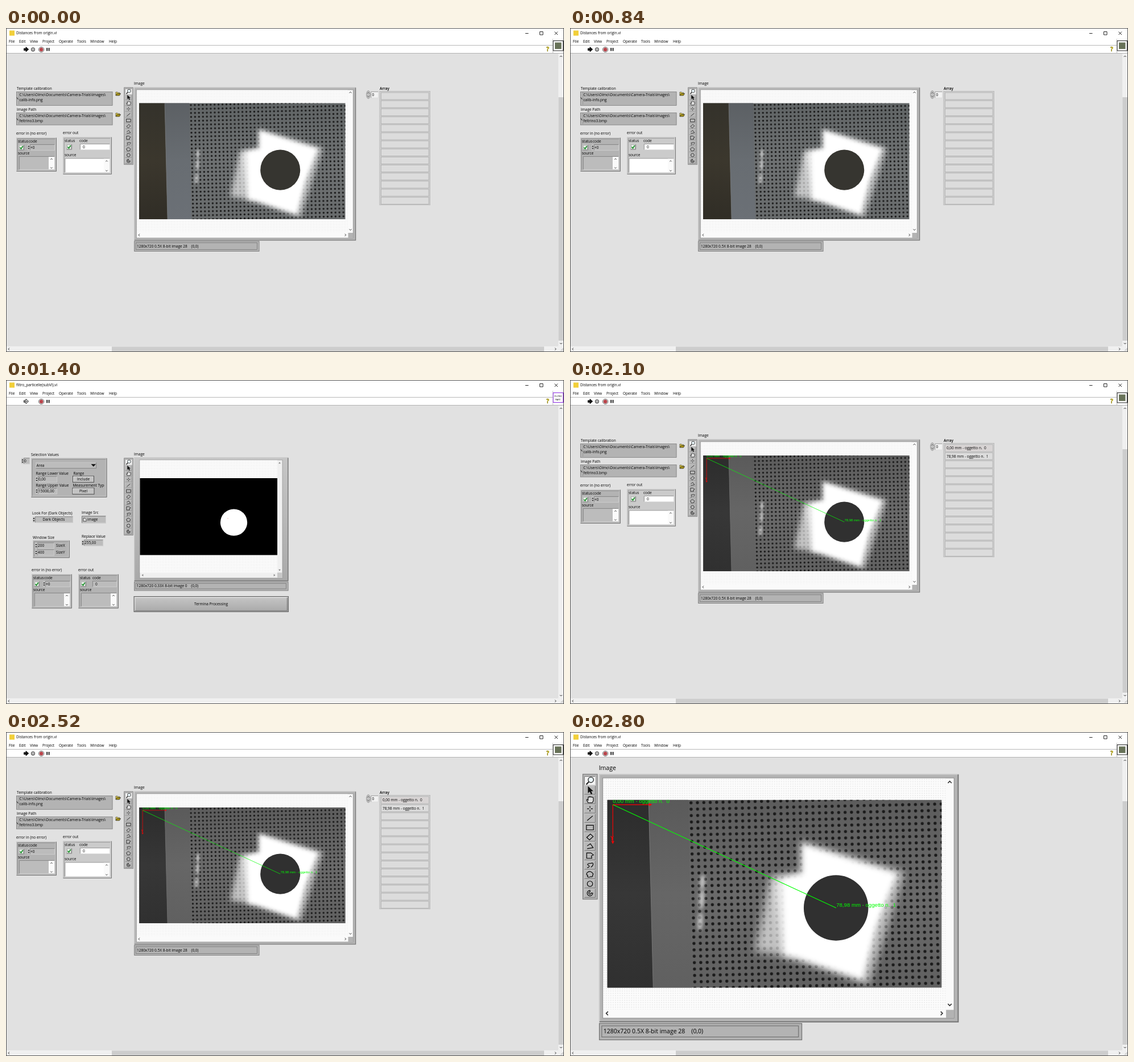
An HTML page that plays this animation: 981 px wide and 571 px high, repeating every 3.5 s.

```html
<!DOCTYPE html>
<html lang="en">
<head>
<meta charset="utf-8">
<title>Vision panel</title>
<style>
html, body { margin: 0; width: 100%; height: 100%; overflow: hidden; background: #e1e1e1; }
svg { display: block; width: 981px; height: 571px; }
text { font-family: "Open Sans", "Noto Sans", sans-serif; font-size: 6.5px; white-space: pre; }
.mark text { font-family: "Liberation Sans", Arial, sans-serif; font-size: 5.95px; fill: #0f0; }
</style>
</head>
<body>
<svg id="stage" viewBox="0 0 981 571"></svg>
<script>
const LOOP = 3500;
const GREY = '#b3b3b3';
const ZOOM = 'matrix(1.6215 0 0 1.6215 -314.2 -95.7)';

const rect = (x, y, w, h, fill, stroke = 'none', sw = 0.6) =>
  `<rect x="${x}" y="${y}" width="${w}" height="${h}" fill="${fill}" stroke="${stroke}" stroke-width="${sw}"/>`;
const path = (d, stroke = '#000', sw = 0.7, fill = 'none') =>
  `<path d="${d}" fill="${fill}" stroke="${stroke}" stroke-width="${sw}"/>`;
const circle = (x, y, r, fill, stroke = 'none', sw = 0.7) =>
  `<circle cx="${x}" cy="${y}" r="${r}" fill="${fill}" stroke="${stroke}" stroke-width="${sw}"/>`;
// y is the vertical middle of the text
const text = (x, y, s, attrs = '') => `<text x="${x}" y="${y + 2.2}" ${attrs}>${s}</text>`;
const group = (content, attrs = '') => `<g ${attrs}>${content}</g>`;
const at = (x, y, content) => group(content, `transform="translate(${x} ${y})"`);

function bevel(x, y, w, h, fill = GREY, raised = true, sw = 1) {
  const [a, b] = raised ? ['#c8c8c8', '#777'] : ['#777', '#d0d0d0'];
  const r = x + w - sw / 2, d = y + h - sw / 2, l = x + sw / 2, t = y + sw / 2;
  return rect(x, y, w, h, fill) + path(`M${l} ${d}V${t}H${r}`, a, sw) + path(`M${l} ${d}H${r}V${t}`, b, sw);
}
const frame = (x, y, w, h, fill = GREY) => bevel(x, y, w, h, fill) + bevel(x + 2, y + 2, w - 4, h - 4, fill, false, 0.6);

const turns = { up: 0, right: 90, down: 180, left: 270 };
const chevron = (x, y, dir, s = 1, color = '#333') =>
  `<path d="M-2 1L0 -1L2 1" transform="translate(${x} ${y}) rotate(${turns[dir]}) scale(${s})" fill="none" stroke="${color}" stroke-width="1"/>`;
const triangle = (x, y, dir, color = '#888') =>
  `<path d="M-2 1.3L0 -1.5L2 1.3Z" transform="translate(${x} ${y}) rotate(${turns[dir]})" fill="${color}"/>`;
const spinner = (x, y) => rect(x, y - 5, 4, 10, '#c8c8c8') +
  path(`M${x + .4} ${y - 1}l1.6 -2.5l1.6 2.5zM${x + .4} ${y + 1}l1.6 2.5l1.6 -2.5z`, 'none', 0, '#222');
const field = (x, y, w, s, fill = '#bcbcbc') =>
  bevel(x + 4, y - 5.5, w - 4, 11, fill, false, 0.8) + spinner(x, y) + text(x + 5, y, s);
const button = (x, y, w, s) => rect(x, y - 5.5, w, 11, '#c3c3c3', '#333', 0.8) +
  path(`M${x + 1} ${y + 4.5}v-9h${w - 2}`, '#eee', 0.7) + text(x + w / 2, y, s, 'text-anchor="middle"');
const check = (x, y) => bevel(x - 5, y - 5, 10, 10, '#d5d5d5', true, 0.9) +
  rect(x - 3.6, y - 3.6, 7.2, 7.2, '#e9f3e9', '#666', 0.4) +
  path(`M${x - 2.5} ${y}l2 2.5l3.2 -5`, '#138a22', 1.6);
const statusBar = (x, y, w, h, s) => rect(x + .4, y + .4, w - .8, h - .8, GREY, '#757575', 0.8) +
  rect(x + 3, y + 3, w - 7, h - 6.5, GREY, '#6e6e6e', 0.7) + text(x + 4.8, y + h / 2 - 0.3, s);

// ---------- window chrome ----------
function chrome(title, subVi) {
  let s = rect(0, 0, 981, 571, '#e1e1e1') + rect(0, 0, 981, 44, '#fff');
  s += path('M0 30.5H961M0 44.5H981', '#a5a5a5', 0.8);
  s += rect(6, 4.5, 9, 9, '#f2cf3a') + text(18, 9.2, title);
  const menu = { File: 5, Edit: 23, View: 42, Project: 64, Operate: 93, Tools: 125, Window: 148, Help: 181 };
  for (const name in menu) s += text(menu[name], 23.7, name);
  s += path('M913 9.5h5.5M938.5 6.5h5.5v5.5h-5.5zM964.5 6.5l5.5 5.5m0 -5.5l-5.5 5.5', '#111', 0.9);

  const arrow = 'M31.5 36h3.5v-2.5l4.8 4.2l-4.8 4.2v-2.5h-3.5z';
  s += path(arrow, '#111', 0.9, subVi ? '#fff' : '#111');
  if (subVi) s += path('M32 37.8h6', '#111', 1);
  else s += circle(47.5, 37.8, 3, '#eee', '#555', 1.2) + path('M45 38h5M47.5 35.5v5', '#777', 0.7);
  s += path('M60.2 33.6h3.8l2.6 2.6v3.6l-2.6 2.6h-3.8l-2.6 -2.6v-3.6z', '#555', 0.8, '#ddd') + circle(62.1, 38, 3.2, '#b8434a');
  s += path('M72.2 35v5.6M75.6 35v5.6', '#111', 1.8);
  s += `<text x="950" y="41.3" style="font-size:10px;font-weight:700" fill="#e8d000" stroke="#554c00" stroke-width=".35">?</text>`;

  s += path('M961.5 19V44', '#999', 0.6);
  if (subVi) {
    s += rect(962, 22.5, 17.5, 17, '#fff', '#8a2be2', 1);
    s += text(970.7, 27.5, 'FILTRO', 'text-anchor="middle" style="font-size:4px"');
    s += text(970.7, 33.5, 'PART.', 'text-anchor="middle" style="font-size:4px"');
  } else s += rect(962, 22.5, 17.5, 17.5, '#fff', '#222', 1) + rect(965, 25.5, 11.5, 11.5, '#687258');

  s += rect(971, 45, 9.5, 516, '#f0f0f0') + rect(1, 561, 979, 9.5, '#f0f0f0');
  if (!subVi) s += rect(971.3, 122, 8.7, 429, '#cdcdcd') + rect(186, 561.5, 760, 8.5, '#cdcdcd');
  s += chevron(975.7, 50, 'up') + chevron(975.7, 556, 'down') + chevron(5, 565.8, 'left') + chevron(966, 565.8, 'right');
  s += path('M979 564v5m-2 -3v3m-2 -1v1', '#aaa', 0.8);
  return s + rect(0.5, 0.5, 980, 570, 'none', '#555', 1);
}

// ---------- image tools ----------
const toolIcons = [
  circle(1, -1, 2.9, '#eaf6fa', '#222', 0.8) + path('M-1.2 1.2L-4 4', '#222', 1.3),
  path('M-2 -4v7l1.8 -1.6l1.4 3l1.2 -.6l-1.4 -2.8h2.3z', '#000', 0.3, '#111'),
  path('M-2 3.5L-3.6 .5l.6 -.7l1 1v-3.3q.8 -.8 1.2 0q.9 -1.4 1.7 0q1 -.8 1.6 .2q1.2 -.4 1.2 .8v3l-1.2 2z', '#222', 0.8, '#ddd'),
  path('M0 -3v2m0 2v2M-3 0h2m2 0h2'),
  path('M-3 2.5L3 -2.5'),
  path('M-3.8 -2.5h7.6v5h-7.6z'),
  path('M-3.5 .5L.5 -3.2L3.5 -.5L-.5 3.2z'),
  path('M-3 -.5L.5 -2.8L3.5 1.5L-3 2.6'),
  path('M-3.5 -3h4.5l2.8 2.2l-2.3 1.2l.5 2.4h-5.5z'),
  path('M-3 2.7C-1 3 0 1 -1.5 .3C-4 -.5 -2 -2 1 -1.8C5 -3.5 3.5 1 1 2.4'),
  path('M-2.5 -2.3Q0 -4 2 -2.2Q4.5 -.5 2.8 .8Q3.5 3 .8 2.4Q-2 4 -2.8 2Q-1.6 1 -3.5 .4Q-4 -1.5 -2.5 -2.3z'),
  circle(0, 0, 2.9, 'none', '#000'),
  path('M0 -3a3 3 0 1 0 3 3l-1.7 -.2a1.3 1.3 0 1 1 -1.2 -1.2z')
];
const tools = toolIcons.reduce((s, icon, i) => {
  const y = 112 + i * 10.18;
  return s + bevel(209.2, y - 4.9, 12.3, 9.8, i ? '#b8b8b8' : '#f4f4f4', i > 0, 0.6) + at(215.4, y, icon);
}, rect(207.7, 104.9, 15.7, 135.8, GREY, '#808080', 0.8));

// ---------- camera picture ----------
function photo(p) {
  const glow = (points, blur, opacity) =>
    `<polygon points="${points}" fill="#fff" opacity="${opacity}" filter="url(#blur${blur})"/>`;
  const streak = (x, y, ry) =>
    `<ellipse cx="${x}" cy="${y}" rx="2.4" ry="${ry}" fill="#fff" opacity=".7" filter="url(#blur2)" transform="rotate(4 ${x} ${y})"/>`;
  return group(
    rect(234, 132, 364, 206, p.sheet) +
    path('M234 132H279L284 338H234z', 'none', 0, p.dark) +
    path('M279 132H322L326 338H284z', 'none', 0, p.band) +
    path('M279 132L284 338', p.edge, 0.5) +
    path('M322 132H598V338H326z', 'none', 0, 'url(#holes)') +
    streak(337.3, 222, 8) + streak(336.5, 241, 11) + streak(335, 265, 10) +
    glow('411,218 446,212 436,304 394,297', 5, 0.6) +
    glow('443,177 557,211 518,334 424,303 413,216 443,214', 4, 0.55) +
    glow('446,181 548,213 526,270 511,328 427,300 424,219 446,213', 3, 1) +
    `<ellipse cx="482.2" cy="250.2" rx="35" ry="35.6" fill="${p.disc}"/>`,
    `clip-path="url(#${p.clip})"`);
}
const colourPhoto = photo({ sheet: 'url(#sheetC)', dark: 'url(#darkC)', band: 'url(#bandC)', edge: '#808383', disc: '#363530', clip: 'clipC' });
const greyPhoto = photo({ sheet: 'url(#sheetG)', dark: 'url(#darkG)', band: 'url(#bandG)', edge: '#7a7a7a', disc: '#303030', clip: 'clipG' });

const marks = group(
  path('M240.2 138V180m-1.2 -2.5l1.2 2.5l1.2 -2.5M240.2 138H282m-2.5 -1.2l2.5 1.2l-2.5 1.2M238 172l1.4 2.3l1.4 -2.3M239.4 174.3v2.5', '#f00', 0.7) +
  path('M240.2 138L482.3 250.2', '#0f0', 0.7) +
  '<text x="240.2" y="136.4">0,00 mm - oggetto n.  0</text><text x="482.5" y="249">78,98 mm - oggetto n.  1</text>',
  'class="mark" clip-path="url(#clipG)"');

const viewer = text(225, 98, 'Image') + tools +
  bevel(225.2, 104.6, 390, 270, GREY, true, 1.2) +
  rect(229.3, 109, 380.9, 261, '#fafafa', '#888', 0.6) +
  rect(230, 109.5, 371, 251, 'url(#weave)') +
  rect(601.5, 361, 8.5, 8.8, GREY) +
  chevron(605.5, 113.5, 'up') + chevron(605.5, 355.5, 'down') +
  chevron(234, 364.8, 'left') + chevron(596.7, 364.8, 'right') +
  statusBar(225.2, 375.4, 220.3, 18.6, '1280x720 0.5X 8-bit image 28    (0,0)');

// ---------- main panel controls ----------
function pathBox(y, h, label, folder, file) {
  const glyph = path(`M19 ${y + 10.5}l2.4 3.2M19.2 ${y + 13}h.1M21.3 ${y + 10.6}h.1`, '#111', 1);
  const open = path(`M193 ${y + 7}v-6h3l1 1h3v1.5`, '#333', 0.7, '#e9d34c') +
    path(`M193 ${y + 7}l2 -3.5h6.5l-2 3.5z`, '#222', 0.7, '#a99417');
  return text(19, y - 5.5, label) + rect(18.4, y + .4, 168.7, h, GREY, '#7d7d7d', 0.8) +
    path(`M22.7 ${y + 1}v${h - 2}`, '#8a8a8a', 0.6) + glyph + text(23.5, y + 5.8, folder) + text(23.5, y + 14.3, file) + open;
}

function errorBox(x, y, title, w, h, { white = false, spin = true, gap = 0 } = {}) {
  const fill = white ? '#fff' : '#bcbcbc';
  const stepper = spin && !white;
  const codeX = x + (white ? 29 : spin ? 22 : 25);
  const fieldX = x + (white ? 30 : spin ? 20 : 25);
  const edgeX = fieldX + (stepper ? 4 : 0);
  const srcX = x + (white ? 3.5 : 5), srcY = y + 33 + gap;
  return text(x, y - 7, title) + frame(x, y, w, h, white ? '#cbcbcb' : GREY) +
    text(x + 3, y + 6.3, 'status') + text(codeX, y + 6.3, 'code') + check(x + (white ? 11 : 9), y + 17.5) +
    (stepper ? spinner(x + 20, y + 17.5) : '') +
    bevel(edgeX, y + 12, x + w - 3 - edgeX, 11, fill, false, 0.8) +
    text(fieldX + 5, y + 17.5, stepper ? '×0' : '0') +
    text(x + 3, y + 27.5 + gap, 'source') +
    bevel(srcX, srcY, x + w - 3 - srcX, y + h - 3 - srcY, fill, false, 0.8) +
    rect(x + w - 14, srcY + 1, 10, y + h - 5 - srcY, '#fafafa') +
    chevron(x + w - 9, srcY + 5, 'up', 0.9) + chevron(x + w - 9, y + h - 6.5, 'down', 0.9);
}

const folder = 'C:\\Users\\Olmo\\Documents\\Camera-Trials\\Images\\';
let cells = '';
for (let i = 0; i < 14; i++) cells += rect(659.4, 113.9 + i * 14.18, 83.8, 12.2, '#dcdcdc', '#acacac', 0.8);
const mainPanel =
  pathBox(112, 24, 'Template calibration', folder, 'calib-info.png') +
  pathBox(149, 21.5, 'Image Path', folder, 'feltrino3.bmp') +
  errorBox(18, 193, 'error in (no error)', 71, 60) +
  errorBox(100, 192, 'error out', 86, 66, { white: true, gap: 4.5 }) +
  text(657, 106.5, 'Array', 'font-weight="600"') +
  `<ellipse cx="637" cy="117.5" rx="3.4" ry="7" fill="#c4c4c4" stroke="#888" stroke-width=".7"/>` +
  path('M635 116l2 -3l2 3M635 119l2 3l2 -3', '#555', 0.7) +
  bevel(641.5, 112, 13.5, 11.5, '#f2f2f2', false, 0.7) + text(643.5, 117.8, '0') +
  rect(656.9, 111.4, 88.7, 200.4, '#d0d0d0', '#b4b4b4', 0.8) + cells;

const results = rect(660, 115, 82.5, 10.6, '#d8d4d4') + text(662, 120.2, '0,00 mm - oggetto n.  0') +
  text(662, 134.4, '78,98 mm - oggetto n.  1');

// ---------- particle filter panel ----------
const filterPanel =
  text(44, 132, 'Selection Values') + field(27, 142.7, 15, '0') + frame(44, 137.5, 133.5, 69.5) +
  bevel(52, 145, 107, 11, '#bcbcbc', true, 0.8) + text(53.5, 150.5, 'Area') +
  path('M149.5 148.3h8.5l-4.2 4.4z', 'none', 0, '#111') +
  text(52.5, 164.3, 'Range Lower Value') + text(118.5, 164.3, 'Range') +
  field(52, 175, 38, '0,00') + button(117.5, 174.7, 37, 'Include') +
  text(52.5, 185.3, 'Range Upper Value') +
  group(text(117.5, 185.3, 'Measurement Type'), 'clip-path="url(#clipLabel)"') +
  field(52, 195.8, 38, '15000,00') + button(117, 195.7, 38, 'Pixel') +
  text(46, 234.5, 'Look For (Dark Objects)') + field(47, 246, 71, '') + text(84, 246, 'Dark Objects', 'text-anchor="middle"') +
  text(133, 233.5, 'Image Src') + bevel(133, 239.5, 43, 13, '#bcbcbc', false, 1) +
  path('M136 243.5h3l2 2v3.5h-5z', '#222', 0.7, '#ddd') + text(143, 246, 'image') +
  text(47, 277.5, 'Window Size') + frame(47, 282.5, 65, 31) +
  field(51, 292, 34, '200') + text(88, 292, 'SizeX') + field(51, 304, 34, '400') + text(88, 304, 'SizeY') +
  text(133, 275.5, 'Replace Value') + field(133, 287, 38, '255,00') +
  errorBox(45, 342, 'error in (no error)', 71, 60.5) +
  errorBox(127, 342, 'error out', 71, 60.5, { spin: false }) +
  at(0, 32.8, tools) + text(225, 130.8, 'Image') +
  bevel(225, 136.5, 271.5, 218, 'url(#metal)', true, 1.4) +
  rect(235, 141, 251, 208, '#f0f0f0', '#888', 0.6) + rect(235.5, 141.5, 241.5, 198, 'url(#weave)') +
  rect(477, 339.5, 9, 9.5, '#c8c8c8') +
  triangle(481, 146, 'up') + triangle(481, 335, 'down') + triangle(240, 344, 'left') + triangle(472, 344, 'right') +
  rect(235.5, 173, 241.5, 135.5, '#000') + circle(400.5, 251, 23.6, '#fff') + rect(389.6, 243.6, 0.8, 0.8, '#e33') +
  statusBar(225, 355.5, 271.5, 16, '1280x720 0.33X 8-bit image 0    (0,0)') +
  rect(225, 381.5, 271.5, 27, 'url(#metal)', '#555', 0.9) +
  path('M227 406V383.5H494', '#e2e2e2', 1) + path('M227 406.5H494.5V383.5', '#777', 1.2) +
  text(360.5, 395, 'Termina Processing', 'text-anchor="middle"');

// ---------- assembly ----------
const gradient = (id, colors) => `<linearGradient id="${id}" x2="0" y2="1">` +
  colors.map((c, i) => `<stop offset="${i / (colors.length - 1)}" stop-color="${c}"/>`).join('') + '</linearGradient>';
const clip = (id, x, y, w, h) => `<clipPath id="${id}">${rect(x, y, w, h, '#000')}</clipPath>`;
const blur = n => `<filter id="blur${n}" x="-80%" y="-30%" width="260%" height="160%"><feGaussianBlur stdDeviation="${n}"/></filter>`;

const defs = `<defs>
  <pattern id="weave" width="2.5" height="2.5" patternUnits="userSpaceOnUse">${rect(0, 0, 2.5, 2.5, '#fcfcfc') + rect(0, 0, 1.1, 1.1, '#e9e9e9')}</pattern>
  <pattern id="holes" width="6.95" height="6.95" patternUnits="userSpaceOnUse" patternTransform="translate(321.5 132.5) rotate(-1.2)">${circle(3.4, 3.5, 1.65, '#1a1a1a')}</pattern>` +
  [2, 3, 4, 5].map(blur).join('') +
  gradient('sheetC', ['#606465', '#6e7172', '#686b6c']) + gradient('sheetG', ['#5c5c5c', '#6a6a6a', '#606060']) +
  gradient('darkC', ['#34322b', '#3b372d', '#302d26']) + gradient('darkG', ['#2c2c2c', '#373737', '#303030']) +
  gradient('bandC', ['#5c6064', '#686d72', '#6b7076']) + gradient('bandG', ['#5a5a5a', '#666', '#606060']) +
  gradient('metal', ['#c6c6c6', '#a9a9a9']) +
  clip('clipC', 234, 132.6, 362.5, 204.4) + clip('clipG', 234.2, 132.9, 362.5, 204) + clip('clipLabel', 117, 180, 55.5, 11) + '</defs>';

const stage = document.getElementById('stage');
stage.innerHTML = defs +
  group(chrome('Distances from origin.vi', false), 'id="mainWindow"') +
  group(mainPanel, 'id="controls"') + group(results, 'id="results"') +
  group(viewer + group(colourPhoto, 'id="colour"') + group(greyPhoto + marks, 'id="measured"'), 'id="viewer"') +
  group(chrome('filtro_particelle(subVI).vi', true) + filterPanel, 'id="filterWindow"');

const parts = {};
for (const id of ['mainWindow', 'controls', 'results', 'viewer', 'colour', 'measured', 'filterWindow'])
  parts[id] = document.getElementById(id);

const scenes = [
  { until: 1400, show: ['mainWindow', 'controls', 'viewer', 'colour'] },
  { until: 2100, show: ['filterWindow'] },
  { until: 2800, show: ['mainWindow', 'controls', 'results', 'viewer', 'measured'] },
  { until: LOOP, show: ['mainWindow', 'viewer', 'measured'], zoom: true }
];
let current;

function draw() {
  const t = performance.now() % LOOP;
  const scene = scenes.find(s => t < s.until);
  if (scene !== current) {
    current = scene;
    for (const id in parts) parts[id].style.display = scene.show.includes(id) ? '' : 'none';
    parts.viewer.setAttribute('transform', scene.zoom ? ZOOM : '');
  }
  requestAnimationFrame(draw);
}
draw();
</script>
</body>
</html>
```
